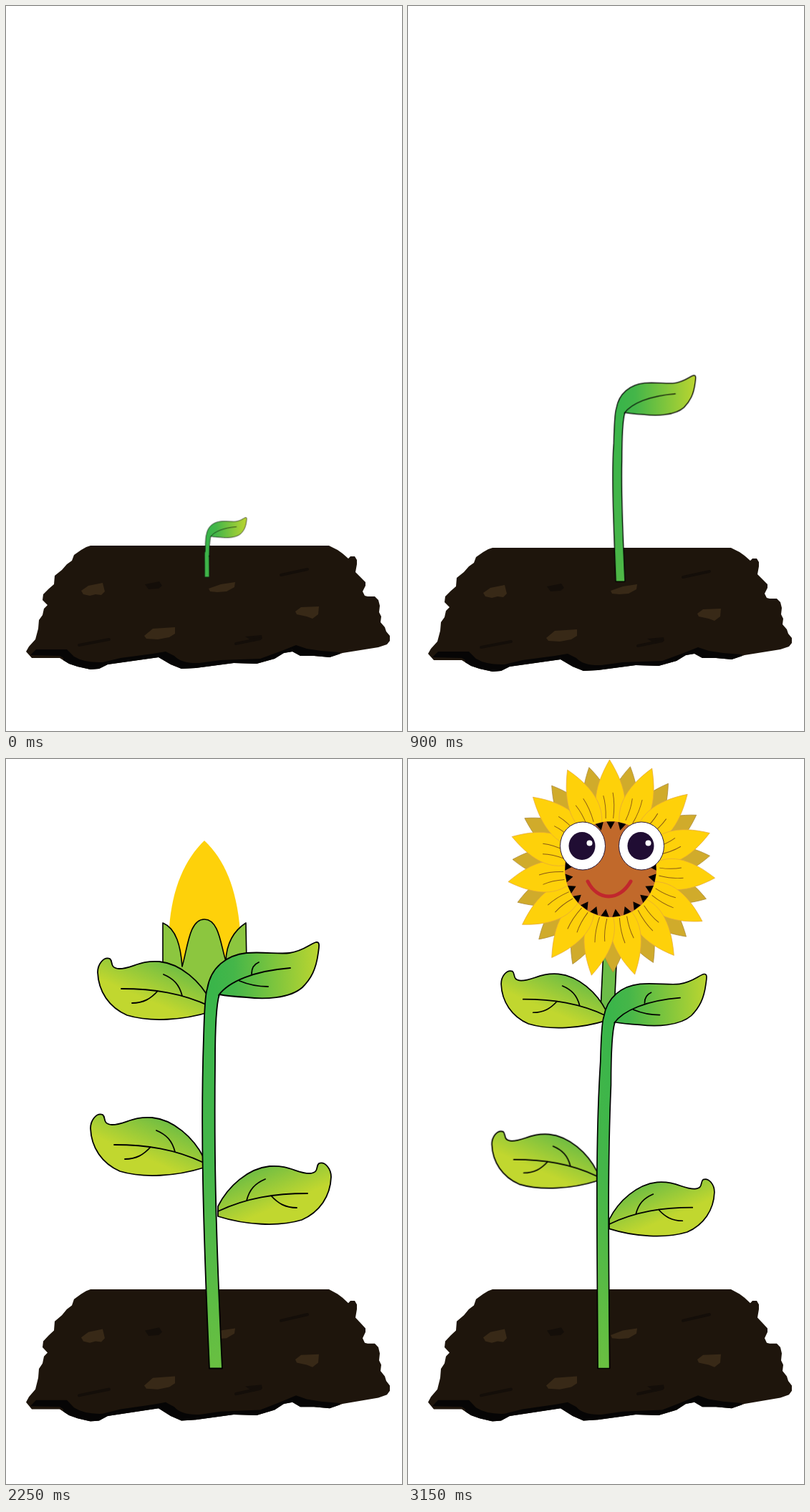
An HTML page for the animation above (3600 ms loop, 553x1013 px).

```html
<!DOCTYPE html>
<html lang="en">
<head>
<meta charset="utf-8">
<title>Growing sunflower</title>
<style>
html, body { margin: 0; width: 100%; height: 100%; overflow: hidden; background: #fff; }
svg { display: block; width: 553px; height: 1013px; }
.stage { opacity: 0; }
.line { fill: none; stroke: #000; stroke-linecap: round; }
.ink { stroke: #000; stroke-linejoin: round; }
.petal { fill: #fed10a; stroke: #e5a83a; stroke-width: .7; }
.back { fill: #d0ab2b; stroke: #a8873a; stroke-width: .7; }
</style>
</head>
<body>
<svg id="art" viewBox="0 0 553 1013" xmlns="http://www.w3.org/2000/svg"></svg>
<script>
const STEP = 450, COUNT = 8, LOOP = STEP * COUNT;

const defs = `<defs>
<radialGradient id="bodyFill" gradientUnits="userSpaceOnUse" cx="0" cy="0" r="1" gradientTransform="translate(-10 5) scale(155 1200)">
  <stop offset="0" stop-color="#39b54a"/><stop offset=".2" stop-color="#45b649"/><stop offset="1" stop-color="#c1d72f"/>
</radialGradient>
<linearGradient id="leafFill" gradientUnits="userSpaceOnUse" x1="42" y1="-68" x2="70" y2="-4">
  <stop offset="0" stop-color="#62b946"/><stop offset="1" stop-color="#c1d72f"/>
</linearGradient>
<path id="ground" d="M118 754H451L463 760 470 765 478 772 481 769H487L490 774V780L488 791 496 799 502 805V810L498 818 501 824 505 825H515L520 830 522 838 521 847 524 853 523 861 529 868 531 874 536 880V887L532 892 520 896 470 904 452 910 430 908H411L400 902 388 904 375 912 350 919 318 918 265 925 245 926 230 920 213 910 142 920 130 926 118 927 100 923 88 919 75 911H36L28 902 32 895 41 885 45 870 46 858 51 851 53 842 58 837 51 830 52 822 60 814 67 808 68 796 78 788 85 780 92 775 95 767 105 760 112 756Z"/>
<clipPath id="groundClip"><use href="#ground"/></clipPath>
<g id="soil">
  <use href="#ground" fill="#1e150c"/>
  <path clip-path="url(#groundClip)" fill="#060505" d="M34 907L42 899H85L95 909Q110 918 135 917L160 911 205 905 223 902 235 908Q245 919 270 918L300 914 355 912 385 901 405 893 420 898 440 901 466 903 466 940H80V911L75 908Z"/>
  <path fill="#382917" d="M105 817L115 810 135 806 138 818 133 823 125 822 117 824 108 822ZM283 814L300 808 320 805 319 812 308 818 295 819 285 818ZM193 880L205 870 236 868 236 877 228 882 212 885 196 884ZM404 846L412 840 437 839 436 850 428 856 420 853 406 850Z"/>
  <path fill="#140e09" d="M194 808L214 804 218 810 213 814 199 815ZM334 881L357 879 358 884 345 888Z"/>
  <path fill="none" stroke="#140e09" stroke-width="4" stroke-linecap="round" d="M384 795L421 787M102 893L144 885M321 891L355 884"/>
</g>
<g id="leaf" stroke-width="1.8">
  <path class="ink" fill="url(#leafFill)" d="M0 -10C14 -38 42 -63 72 -66 100 -68 110 -56 128 -56 142 -57 136 -66 141 -70 150 -73 158 -62 158 -51 157 -24 142 -2 117 9 84 19 38 16 0 4Z"/>
  <path class="line" d="M0 -3C40 -22 80 -28 125 -28M74 -25C84 -14 94 -8 110 -8M40 -18C44 -34 52 -42 66 -48"/>
</g>
</defs>`;

const soil = (top, height) =>
  `<use href="#soil" transform="translate(0 ${top}) scale(1 ${height / 173}) translate(0 -754)"/>`;

const leaf = (x, y, k, side) =>
  `<use href="#leaf" transform="translate(${x} ${y}) scale(${k * side} ${k})"/>`;

// Stem and top leaf in one outline; (x, y) is where the leaf meets the stem.
function sprout(x, y, k, base, foot, bulge = 1.2, veins = false) {
  const len = (base - y) / k;
  const side = veins ? 'M28 -19C40 -14 53 -11 68 -11M45 -29C45 -36 48 -42 55 -45' : '';
  return `<g transform="translate(${x} ${y}) scale(${k})" stroke-width="1.8">
    <path class="ink" fill="url(#bodyFill)" d="M${foot - 23} ${len}
      C${-22 - bulge} ${len * .6} ${-25 - bulge} ${len * .35} -22 60C-21 20 -20 0 -17 -8
      C-12 -38 10 -55 38 -58C60 -60 85 -56 98 -58C118 -61 127 -71 135 -73
      C141 -74 139 -66 138 -58C135 -35 128 -22 116 -10C98 6 62 7 38 4C22 3 10 2 0 0
      C-5 15 -6 60 -6 ${Math.min(95, len * .5)}C${-6 - bulge} ${len * .4} ${-5 - bulge} ${len * .6} ${foot - 5} ${len}Z"/>
    <path class="line" d="M-1 1C13 -18 48 -33 99 -37${side}"/></g>`;
}

const youngPlant = dx => {
  const dy = dx ? 1 : 0;
  return leaf(260 + dx, 348 + dy, 1, -1) + leaf(250 + dx, 566 + dy, 1, -1) +
    leaf(270 + dx, 634 + dy, 1, 1) + sprout(272 + dx, 328 + dy, 1, 851.5, 9, 1.2, true);
};

const grownPlant = dy =>
  `<path class="ink" fill="#6cbd48" stroke-width="1.6" d="M274 245H293L288 350H269Z"/>` +
  leaf(277, 361 + dy, .93, -1) + leaf(264, 585 + dy, .93, -1) +
  leaf(281, 652 + dy, .93, 1) + sprout(289, 367 + dy, .92, 851.5, -3, 5, true);

const bud = `<path fill="#fed10a" d="M277 114C305 140 322 180 327 240V290H228V235C232 180 250 140 277 114Z"/>
  <path class="ink" fill="#8cc63f" stroke-width="1.6" d="M219 229C238 237 244 262 246 290C254 262 256 224 277 224
    C298 224 300 262 307 282C308 258 318 240 335 229L336 285 300 318 283 334 219 292Z"/>`;

const opening = `<path class="back" d="M289 46C305 62 314 80 318 100L289 160 260 100C265 80 275 60 289 46Z
    M192 73C205 76 218 80 230 90L225 140 190 100ZM374 74L382 105 345 140 350 88Z"/>
  <path class="petal" d="M167 75C195 90 215 115 225 140L245 205 193 192C170 160 164 120 167 75Z
    M407 75C379 90 359 115 349 140L329 205 381 192C404 160 410 120 407 75Z"/>
  <path class="petal" d="M231 31C262 60 285 105 289 160V215L245 210C215 150 208 90 231 31Z
    M348 32C365 90 355 155 330 210L289 215V160C295 120 320 70 348 32Z"/>
  <path fill="#8cc63f" d="M188 188C205 184 225 195 241 209C232 195 220 175 222 168C230 162 250 178 269 207
    C265 190 262 156 270 155C278 154 281 185 286 206C293 185 295 154 303 155C311 156 309 190 305 207
    C324 178 344 162 351 168C353 175 342 195 333 209C350 195 370 184 386 189
    C350 212 340 251 287 251C233 251 225 212 188 188Z"/>`;

const ring = (n, start, draw) =>
  Array.from({ length: n }, (_, i) => `<g transform="rotate(${start + i * 360 / n})">${draw}</g>`).join('');

const eye = x => `<ellipse cx="${x}" cy="121.5" rx="31.5" ry="33.5" fill="#fff" stroke="#2a1a3a"/>
  <ellipse cx="${x - 1}" cy="121.5" rx="18.5" ry="19.5" fill="#200d33"/>
  <circle cx="${x + 9.5}" cy="117.5" r="4" fill="#fff"/>`;

const bloom = `<g transform="translate(284 153) scale(.955 1)">
    ${ring(15, 11, '<path class="back" d="M0 -45C-30 -75 -24 -108 0 -145C24 -108 30 -75 0 -45Z"/>')}
    <circle r="82" fill="#fed10a"/>
    ${ring(15, -1, `<path class="petal" d="M0 -45C-32 -76 -25 -112 0 -152C25 -112 32 -76 0 -45Z"/>
      <path fill="none" stroke="#8a5a14" d="M-7 -70Q-6 -88 -10 -102M4 -70Q7 -90 4 -106"/>`)}</g>
  <g transform="translate(283 154) scale(.955 1)">
    <circle r="67" fill="#c1692b"/>
    ${ring(25, 0, '<path d="M-6 -66.5H6L0 -56Z"/>')}</g>
  ${eye(244)}${eye(326)}
  <path fill="none" stroke="#c1272d" stroke-width="5" stroke-linecap="round" d="M251 171C265 199 295 199 311 171"/>`;

const low = soil(741, 184.5);
const stages = [
  soil(754, 173) + sprout(286, 741, .36, 798, -1),
  soil(757, 173.5) + sprout(293, 695, .5, 801, 2),
  soil(757, 173) + sprout(303, 568, .71, 804, 5),
  soil(749, 178) + leaf(284, 683, .85, 1) + sprout(286, 437, .86, 828, 7, 1.2, true),
  low + youngPlant(0),
  low + bud + youngPlant(26),
  low + grownPlant(0) + opening,
  low + grownPlant(.7) + bloom
];

const art = document.getElementById('art');
art.innerHTML = defs + stages.map(s => `<g class="stage">${s}</g>`).join('');

art.querySelectorAll('.stage').forEach((el, i) => {
  el.animate([
    { opacity: 1, offset: 0, easing: 'step-end' },
    { opacity: 0, offset: 1 / COUNT },
    { opacity: 0, offset: 1 }
  ], { duration: LOOP, delay: i * STEP - LOOP, iterations: Infinity });
});
</script>
</body>
</html>
```
